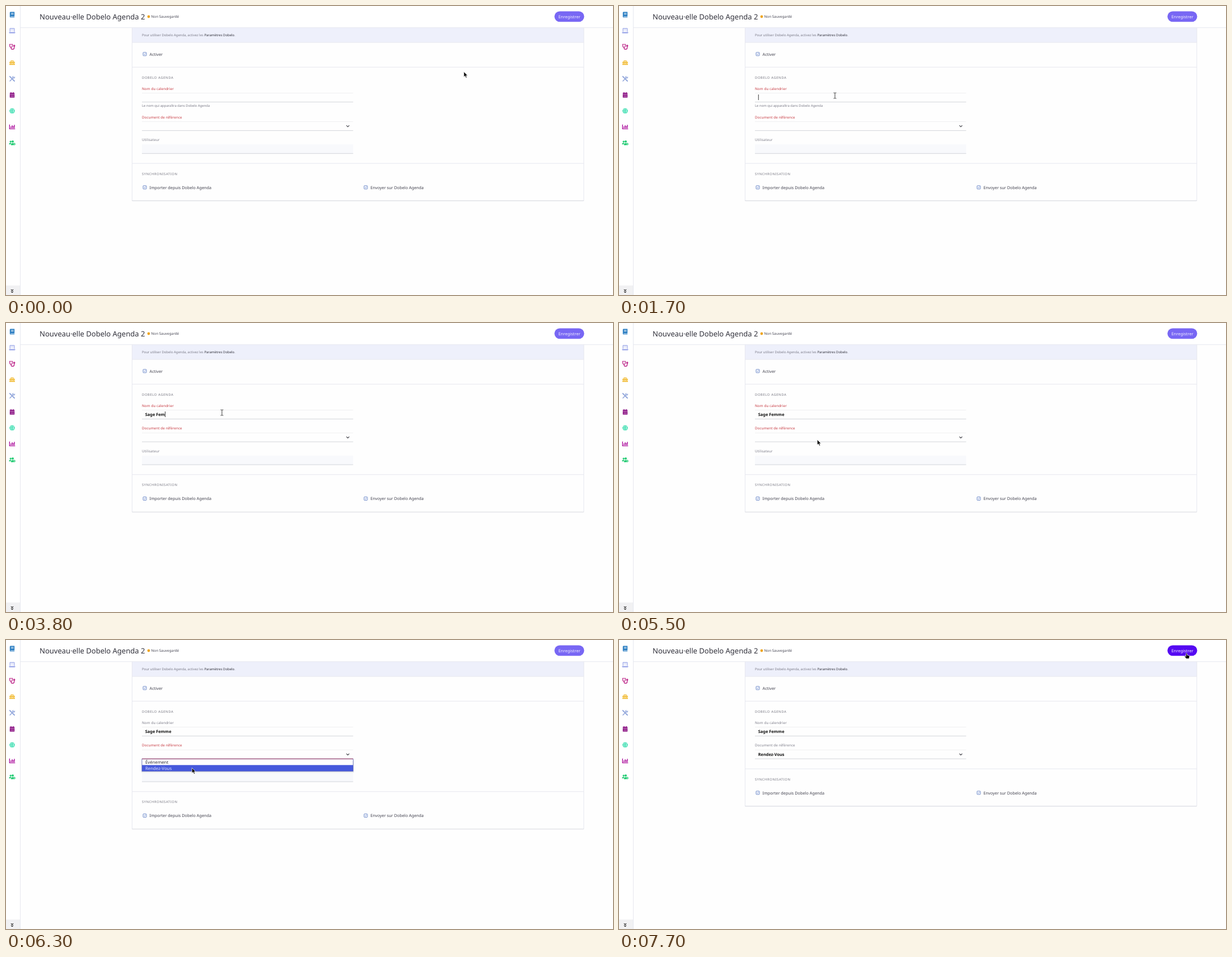
An HTML page for the animation above (8 s loop, 1085 by 516 pixels).

```html
<!DOCTYPE html>
<html lang="fr">
<head>
<meta charset="utf-8">
<title>Formulaire d'agenda</title>
<style>
html, body { margin: 0; width: 100%; height: 100%; overflow: hidden; background: #fefefe; }
svg { display: block; }
text { font: 7.3px "Noto Sans", sans-serif; fill: #42424f; white-space: pre; text-rendering: geometricPrecision; }
.title { font-size: 13px; fill: #30303a; }
.status { font-size: 6.25px; font-weight: 500; letter-spacing: .07px; }
.save { font-size: 7.5px; fill: #f3f0ff; }
.head { font-size: 5.9px; letter-spacing: .58px; fill: #74747f; }
.note { font-size: 5.95px; fill: #7b7b88; }
.note tspan { fill: #33333d; }
.label { font-size: 6.25px; letter-spacing: .11px; fill: #7b7b88; }
.value { font-size: 7.4px; font-weight: 700; fill: #111; }
.option { font-size: 7.8px; fill: #30303a; }
.on .option { fill: #dfe3ff; }
.on rect { fill: #4659dc; }
.option-row rect { fill: #fff; }
.on.option-row rect { fill: #4659dc; }
.rule { stroke: #e6e7ef; fill: none; }
.top { stroke: #f0f0f1; }
.line { stroke: #d3d5da; }
.glow { visibility: hidden; fill: none; stroke: #d9d9dc; }
.focus .glow { visibility: visible; }
.focus .top { visibility: hidden; }
.focus .line { stroke: #c5c5ca; }
.bad .label { fill: #c5343c; }
.bad .line { stroke: #c0434a; }
.bad .glow { stroke: #f08a88; }
.bad.focus .line { stroke: #c62f38; stroke-width: 1.4; }
.icon { fill: none; stroke: currentColor; stroke-width: 1.2; stroke-linecap: round; stroke-linejoin: round; }
.solid { fill: currentColor; stroke: none; }
</style>
</head>
<body>
<svg width="1085" height="516" viewBox="0 0 1085 516">
  <defs>
    <g id="box">
      <rect x="-3" y="-3" width="6" height="6" rx=".8" fill="#f5f7ff" stroke="#6684c4" stroke-width=".9"/>
      <path d="M-1.5 0L-.4 1.1L1.6 -1.2" fill="none" stroke="#6684c4" stroke-width=".8"/>
    </g>
    <g id="edges">
      <path class="top" d="M243 155.5H620.5"/>
      <rect class="glow" x="242.5" y="154.5" width="378.5" height="17.5" rx="2" stroke-width="3.4" opacity=".2"/>
      <rect class="glow" x="243" y="155" width="377.5" height="16.5" rx="1.5" stroke-width=".8" opacity=".75"/>
      <path class="line" d="M243 171.4H620.5"/>
    </g>
  </defs>

  <rect width="1085" height="516" fill="#fefefe"/>
  <rect x="225" y="39" width="808" height="26" fill="#eef0fb"/>
  <path class="rule" d="M225 65H1033M225 109.2H1033"/>
  <text class="note" x="243" y="53.8">Pour utiliser Dobelo Agenda, activez les <tspan>Paramètres Dobelo</tspan>.</text>
  <use href="#box" x="248" y="85.8"/>
  <text x="256.5" y="88.7">Activer</text>
  <text class="head" x="243" y="130">DOBELO AGENDA</text>

  <g id="name">
    <text class="label" x="243" y="149.5">Nom du calendrier</text>
    <use href="#edges"/>
    <text class="value" id="typed" x="248.7" y="165.9"></text>
    <path id="caret" d="M0 158V168" stroke="#222" stroke-width=".9"/>
  </g>
  <text class="note" id="help" x="243" y="180.2">Le nom qui apparaîtra dans Dobelo Agenda</text>

  <g id="lower">
    <g id="user">
      <text class="label" x="243" y="241.2">Utilisateur</text>
      <rect x="243" y="247" width="377.5" height="16.5" fill="#f8f9fc"/>
      <path class="line" d="M243 263.3H620.5"/>
    </g>
    <g id="doc">
      <text class="label" x="243" y="200.5">Document de référence</text>
      <use href="#edges" y="51"/>
      <text class="value" id="choice" x="248.7" y="217">Rendez-Vous</text>
      <path d="M608.5 213.2L611 215.8L613.5 213.2" fill="none" stroke="#383840" stroke-width="1.1"/>
    </g>
    <g id="sync">
      <path class="rule" d="M225 281H1033M225.4 39V347.5M1032.8 39V347.5"/>
      <path d="M225 347.6H1033" stroke="#d9dbe2"/>
      <path d="M226 348.6H1032" stroke="#f3f3f6"/>
      <text class="head" x="243" y="301.7">SYNCHRONISATION</text>
      <use href="#box" x="248" y="323.8"/>
      <text x="256.5" y="326.8">Importer depuis Dobelo Agenda</text>
      <use href="#box" x="643" y="323.8"/>
      <text x="651.5" y="326.8">Envoyer sur Dobelo Agenda</text>
    </g>
  </g>

  <g id="menu">
    <rect x="242" y="214" width="380" height="23" rx="1" fill="#445" opacity=".1"/>
    <g class="option-row"><rect x="243" y="212.5" width="377.5" height="11"/><text class="option" x="249" y="221">Événement</text></g>
    <g class="option-row"><rect x="243" y="223.3" width="377.5" height="11"/><text class="option" x="249" y="231.5">Rendez-Vous</text></g>
    <rect x="243" y="212.5" width="377.5" height="21.8" fill="none" stroke="#5a66b8" stroke-width=".8"/>
    <path d="M243 212.2H620.5" stroke="#a53a62"/>
  </g>

  <rect width="1085" height="38.5" fill="#fff"/>
  <path class="rule" d="M25 38.7H1085"/>
  <text class="title" x="60" y="23.7">Nouveau·elle Dobelo Agenda 2</text>
  <circle cx="255" cy="19" r="2.4" fill="#efa51c"/>
  <text class="status" x="259.5" y="21.2">Non Sauvegardé</text>
  <rect id="button" x="980.3" y="9.4" width="53.2" height="18.8" rx="9.4"/>
  <text class="save" x="1007" y="21.7" text-anchor="middle">Enregistrer</text>

  <rect width="25" height="516" fill="#fff"/>
  <path class="rule" d="M25.5 0V516"/>
  <rect y="499" width="25" height="17" fill="#f1f1f3"/>
  <path d="M9 506.3L11 508.2L13 506.3M9 509.6L11 511.5L13 509.6" fill="none" stroke="#222" stroke-width="1.2"/>

  <g class="icon" transform="translate(11 15.5)" color="#2f80c3">
    <path class="solid" d="M-2.8 -5H4.2V3H3.6V4.2H4.2V5H-2.8Q-4.2 5 -4.2 3.5V-3.6Q-4.2 -5 -2.8 -5Z"/>
    <path d="M-1.7 -2.5H2.2M-1.7 -.8H2.2M-2.5 3.6H3" stroke="#fff" stroke-width=".8"/>
  </g>
  <g class="icon" transform="translate(11 44)" color="#98a4e8">
    <path d="M-3.8 1.3V-3.8H3.8V1.3M-5 3.2H5Q5 4.2 4 4.2H-4Q-5 4.2 -5 3.2Z"/>
    <path d="M-.8 -2.2L-1.8 -1.2L-.8 -.2M.8 -2.2L1.8 -1.2L.8 -.2" stroke-width=".8"/>
  </g>
  <g class="icon" transform="translate(11 72.8)" color="#b50e7c" stroke-width="1.4">
    <path d="M-3 -4.4H-4.2V-1.5Q-4.2 1 -2 1Q.2 1 .2 -1.5V-4.4H-1M-2 1V2Q-2 4.6 .8 4.6Q3.6 4.6 3.6 2V-.6"/>
    <circle cx="3.6" cy="-1.8" r="1.2"/>
  </g>
  <g class="icon" transform="translate(11 101.3)" color="#f3c34b">
    <path class="solid" d="M-4 -2H4L5 -.8V.8H-5V-.8ZM-5 1.5H5V4H-5Z"/>
    <path d="M-2 -2V-3.7H2V-2"/>
    <path d="M-2.2 .3V2M2.2 .3V2"/>
  </g>
  <g class="icon" transform="translate(11 130)" color="#8fa4da">
    <path d="M-4.2 -4.2L-1 -1M.8 .8L4 4" stroke-width="1.9"/>
    <path d="M-4 4L2 -2M1.6 -4.3Q.5 -1.2 2 -1.5Q4.6 -1 4.4 -3" stroke-width="1.5"/>
  </g>
  <g class="icon" transform="translate(11 158.7)" color="#86087f">
    <path class="solid" d="M-4.2 -3.8H4.2V-2H-4.2ZM-4.2 -1.5H4.2V4.8H-4.2Z"/>
    <path d="M-2 -4.5V-3M2 -4.5V-3"/>
    <path d="M-2.5 .3H2.8M-2.5 2.8H2.8" stroke="#fff" stroke-width="1.1" stroke-dasharray="1.1 1" stroke-linecap="butt"/>
  </g>
  <g class="icon" transform="translate(11 187.3)" color="#2fdcab">
    <circle class="solid" r="4.8"/>
    <path d="M-4.6 -1.6H4.6M-4.6 1.6H4.6" stroke="#fff" stroke-width=".6"/>
    <ellipse rx="2.1" ry="4.8" stroke="#fff" stroke-width=".6"/>
  </g>
  <g class="icon" transform="translate(11 215.8)" color="#ab0b9b">
    <path d="M-4.6 -3.7V3.6H4.7M-2.2 1.5V0M0 1.5V-2.3M2 1.5V-.8M4 1.5V-3" stroke-width="1.4"/>
  </g>
  <g class="icon" transform="translate(11 244.5)" color="#24cb74">
    <circle class="solid" cx="-2.8" cy="-2.4" r="1.7"/>
    <circle class="solid" cx="1" cy="-2.5" r="2"/>
    <path class="solid" d="M-5.6 2.6Q-5.6 -.3 -3 -.3Q-1.6 -.3 -1.5 .5Q-2.8 1.5 -2.8 2.6ZM-2.3 4Q-2.3 .2 1 .2Q2.3 .2 2.4 1V4Z"/>
    <circle cx="3.8" cy="2" r="1.4"/>
  </g>

  <g id="pointer" stroke="#fff" stroke-width=".7" stroke-linejoin="round">
    <path id="arrow" d="M.3 .3V9.8L2.5 7.8L4.1 11.2L5.8 10.4L4.2 7.2H7.2Z" fill="#0b0b0b"/>
    <path id="beam" d="M-2.4 -5H-.5L0 -4.5L.5 -5H2.4M0 -4.5V4.5M-2.4 5H-.5L0 4.5L.5 5H2.4" fill="none" stroke="#3a3a3a" stroke-width="1"/>
    <path id="hand" d="M-1.2 .8Q0 -.8 .9 .8V3.4L4.8 4.2Q5.5 4.5 5.3 6L4.5 9.8H-.8L-3.8 5.6Q-3.4 4.2 -1.2 5.8Z" fill="#0b0b0b"/>
  </g>
</svg>
<script>
const LOOP = 8000;
const $ = id => document.getElementById(id);

// Pointer stops: time, x, y
const path = [
  [0, 818, 117], [400, 814, 117], [600, 773, 114], [900, 757, 112],
  [1100, 742, 115], [1200, 665, 126], [1300, 560, 141], [1400, 468, 152], [1500, 404, 159], [1600, 386, 160],
  [5100, 384, 163], [5200, 378, 174], [5300, 368, 189], [5400, 358, 202], [5500, 354, 208],
  [5900, 352, 215], [6000, 346, 225], [6100, 340, 236], [6200, 334, 242], [6300, 332, 228],
  [7000, 448, 243], [7100, 560, 246], [7200, 725, 205], [7300, 890, 130],
  [7400, 1010, 66], [7500, 1058, 36], [7600, 1030, 25], [7700, 1014.5, 23.5]
];

const typing = [
  [0, ""], [2700, "S"], [2900, "Sa"], [3000, "Sag"], [3200, "Sage"], [3300, "Sage "],
  [3600, "Sage F"], [3700, "Sage Fe"], [3800, "Sage Fem"], [4200, "Sage Femme"],
  [4600, "Sage Femm"], [4700, "Sage Femme"]
];

const at = (list, t) => list.findLast(step => step[0] <= t);
const show = (el, on) => { el.style.display = on ? "" : "none"; };
const shift = (el, y) => el.setAttribute("transform", `translate(0 ${y})`);
const rows = document.querySelectorAll(".option-row");

function draw(t) {
  const between = (a, b) => t >= a && t < b;
  const [, x, y] = at(path, t);
  const named = t >= 2700, picked = t >= 6600, compact = t >= 6700;

  $("pointer").setAttribute("transform", `translate(${x} ${y})`);
  const beam = between(1500, 5200), hand = t >= 7600;
  show($("beam"), beam);
  show($("hand"), hand);
  show($("arrow"), !beam && !hand);

  const typed = $("typed");
  typed.textContent = at(typing, t)[1];
  const end = typed.textContent ? typed.getComputedTextLength() : 0;
  $("caret").setAttribute("transform", `translate(${249.3 + end} 0)`);
  show($("caret"), between(1700, 2500) || between(2700, 5100));

  $("name").classList.toggle("bad", t < 5600);
  $("name").classList.toggle("focus", between(1600, 5600));
  $("doc").classList.toggle("bad", !picked);
  $("doc").classList.toggle("focus", t >= 5600);

  show($("help"), !named);
  show($("choice"), picked);
  show($("user"), !compact);
  shift($("lower"), named ? -10.3 : 0);
  shift($("sync"), compact ? -40.7 : 0);

  show($("menu"), between(5700, 6600));
  rows[0].classList.toggle("on", between(5900, 6000));
  rows[1].classList.toggle("on", t >= 6000);

  $("button").setAttribute("fill", t >= 7700 ? "#5509f2" : t >= 7600 ? "#6639f3" : "#7867f4");
}

const start = performance.now();
function tick() {
  draw((performance.now() - start) % LOOP);
  requestAnimationFrame(tick);
}
tick();
</script>
</body>
</html>
```
